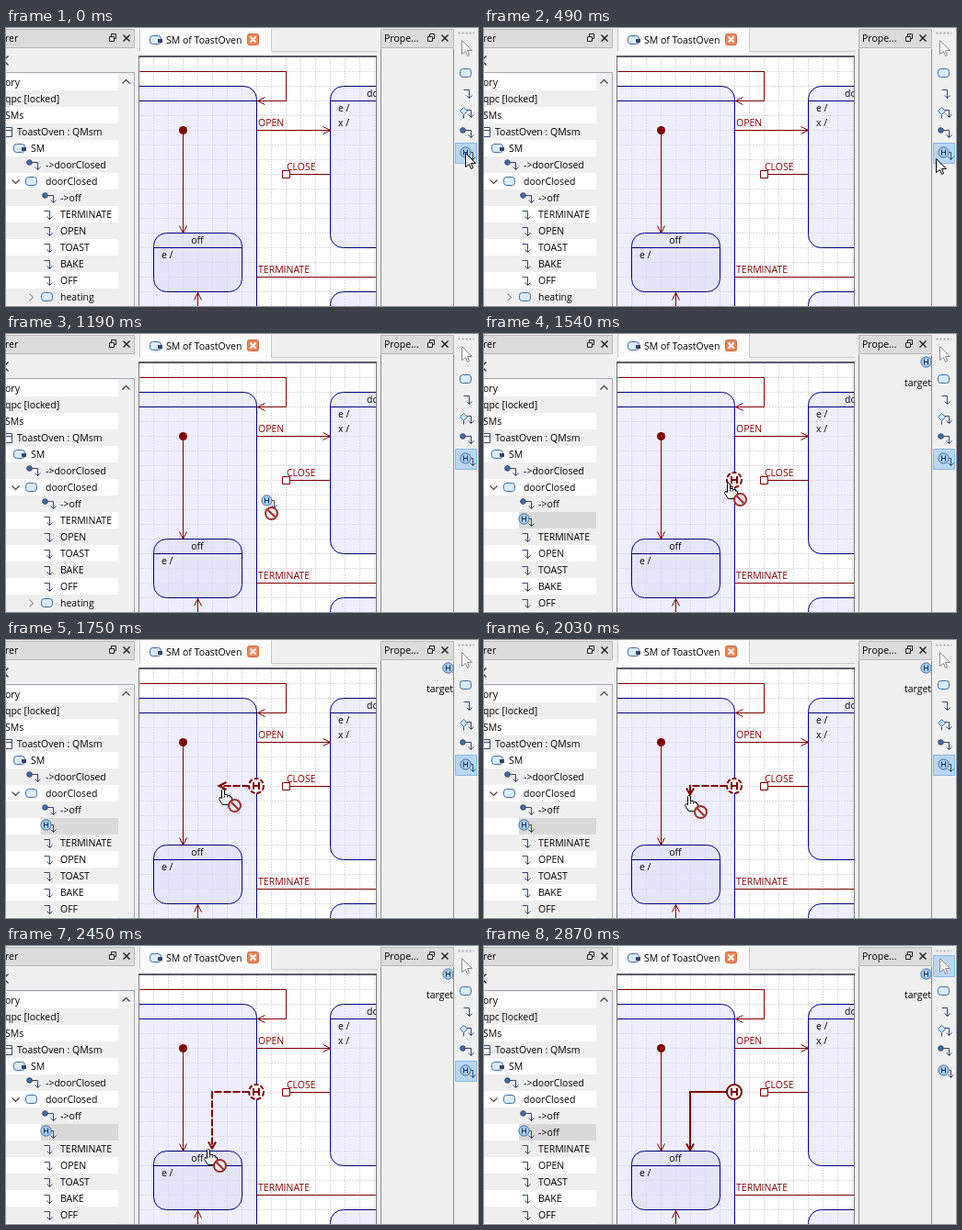
An HTML page with a canvas for the animation above (4.01 s loop, 513x303 px).

```html
<!DOCTYPE html>
<html lang="en">
<head>
<meta charset="utf-8">
<title>State machine editor</title>
<style>
html, body { margin: 0; width: 100%; height: 100%; overflow: hidden; background: #f0f0f0; }
canvas { display: block; }
</style>
</head>
<body>
<canvas id="stage" width="513" height="303"></canvas>
<script>
const ctx = document.getElementById('stage').getContext('2d');
const LOOP = 4010, STEP = 70, DRAG = 560, DROP = 1470, DONE = 2870;
const RED = '#800000', NAVY = '#000080', ICON = '#34466e', BLUE = '#a9cdf0';
const FONT = '10.5px "Open Sans", "Noto Sans", sans-serif';

// Pointer way: time, x, y
const way = [
  [0, 499, 136], [420, 499, 136], [490, 491, 142], [560, 474, 143], [700, 412, 156],
  [840, 346, 172], [910, 319, 178], [980, 302, 181], [1050, 294, 181], [1190, 283, 181],
  [1260, 272, 163], [1400, 272, 163], [1470, 272, 162], [1610, 259, 162], [1820, 224, 162],
  [1960, 224, 162], [2030, 223, 169], [2240, 223, 200], [2380, 221, 217], [2450, 220, 221],
  [2520, 220, 221], [2590, 221, 223], [LOOP, 221, 223]
];

function pointerAt(t) {
  const i = way.findIndex(p => p[0] > t);
  const a = way[i - 1], b = way[i], k = (t - a[0]) / (b[0] - a[0]);
  return [1, 2].map(n => Math.round(a[n] + (b[n] - a[n]) * k));
}

function rect(x, y, w, h, color) {
  ctx.fillStyle = color;
  ctx.fillRect(x, y, w, h);
}

function clipped(x, y, w, h, draw) {
  ctx.save();
  ctx.beginPath();
  ctx.rect(x, y, w, h);
  ctx.clip();
  draw();
  ctx.restore();
}

function line(points, color, width = 1, dash = []) {
  ctx.beginPath();
  for (let i = 0; i < points.length; i += 2) ctx.lineTo(points[i] + .5, points[i + 1] + .5);
  ctx.strokeStyle = color;
  ctx.lineWidth = width;
  ctx.setLineDash(dash);
  ctx.stroke();
  ctx.setLineDash([]);
}

function text(s, x, y, color = '#000', align = 'left') {
  ctx.font = FONT;
  ctx.textAlign = align;
  ctx.fillStyle = color;
  ctx.fillText(s, x, y);
}

function circle(x, y, r, fill, stroke, width = 1, dash = []) {
  ctx.beginPath();
  ctx.arc(x + .5, y + .5, r, 0, 7);
  ctx.fillStyle = fill;
  ctx.fill();
  if (!stroke) return;
  ctx.strokeStyle = stroke;
  ctx.lineWidth = width;
  ctx.setLineDash(dash);
  ctx.stroke();
  ctx.setLineDash([]);
}

function roundBox(x, y, w, h, r, fill, stroke) {
  ctx.beginPath();
  ctx.roundRect(x + .5, y + .5, w, h, r);
  ctx.fillStyle = fill;
  ctx.fill();
  ctx.strokeStyle = stroke;
  ctx.lineWidth = 1;
  ctx.stroke();
}

// Open arrow head with its tip at x, y, pointing along dx, dy
function head(x, y, dx, dy, len, half, color, width = 1) {
  const bx = x - dx * len, by = y - dy * len;
  line([bx + dy * half, by + dx * half, x, y, bx - dy * half, by - dx * half], color, width);
}

function polygon(x, y, points, fill, stroke) {
  ctx.beginPath();
  for (let i = 0; i < points.length; i += 2) ctx.lineTo(x + points[i] + .5, y + points[i + 1] + .5);
  ctx.closePath();
  ctx.fillStyle = fill;
  ctx.fill();
  ctx.strokeStyle = stroke;
  ctx.lineWidth = 1;
  ctx.stroke();
}

const icons = {
  state: (x, y) => roundBox(x - 6, y - 5, 12, 9, 3, '#d9ecfa', '#3d6a9e'),
  machine(x, y) {
    icons.state(x, y);
    rect(x + 3, y - 1, 5, 4, ICON);
  },
  transition(x, y) {
    line([x - 5, y - 4, x + 1, y - 4, x + 1, y + 5], ICON);
    head(x + 1, y + 5, 0, 1, 3, 3, ICON);
  },
  hook(x, y) {
    line([x - 2, y - 3, x + 5, y - 3, x + 5, y + 5], ICON);
    head(x + 5, y + 5, 0, 1, 3, 3, ICON);
  },
  initial(x, y) {
    icons.hook(x, y);
    circle(x - 4, y - 3, 2.8, '#4a6ba6', ICON);
  },
  choice(x, y) {
    icons.hook(x, y);
    line([x - 3, y + 2, x - 3, y + 6], ICON);
    polygon(x - 3, y - 2, [0, -4, 4, 0, 0, 4, -4, 0], '#cfe6f8', '#3d6a9e');
  },
  history(x, y) {
    line([x + 2, y, x + 8, y, x + 8, y + 8], ICON);
    head(x + 8, y + 8, 0, 1, 3, 3, ICON);
    circle(x, y, 5.6, BLUE, '#3d6a9e');
    line([x - 2, y - 3, x - 2, y + 3], '#12305e');
    line([x + 2, y - 3, x + 2, y + 3], '#12305e');
    line([x - 2, y, x + 2, y], '#12305e');
  },
  project(x, y) {
    roundBox(x - 4, y - 5, 9, 10, 0, '#fff', ICON);
    line([x - 4, y - 2, x + 5, y - 2], ICON);
  }
};

function arrowCursor(x, y, fill = '#fff', stroke = '#000') {
  polygon(x, y, [0, 0, 0, 15, 4, 12, 6, 17, 8, 16, 6, 11, 11, 11], fill, stroke);
}

function handCursor(x, y) {
  polygon(x, y, [-1, 0, 1, 1, 1, 6, 4, 6, 5, 7, 7, 7, 8, 9, 9, 9, 9, 13, 7, 17, -1, 17,
    -5, 11, -4, 9, -2, 10, -2, 1], '#fff', '#000');
  for (const i of [1, 4, 7]) line([x + i, y + 7, x + i, y + 9], '#000');
}

function noEntry(x, y) {
  circle(x, y, 6.5, '#e9e9e9', '#9c2c2c', 2);
  line([x - 4, y - 4, x + 4, y + 4], '#9c2c2c', 2);
}

function panelHeader(x, w, title, titleX, buttonX) {
  roundBox(x, 1, w, 20, 0, '#dcdcdc', '#b8b8b8');
  text(title, titleX, 15);
  roundBox(buttonX + 2, 6, 5, 5, 0, '#dcdcdc', '#222');
  roundBox(buttonX, 9, 5, 5, 0, '#dcdcdc', '#222');
  line([buttonX + 15, 7, buttonX + 22, 14], '#222', 1.5);
  line([buttonX + 22, 7, buttonX + 15, 14], '#222', 1.5);
}

function drawTree(t) {
  panelHeader(-1, 140, 'rer', -1, 112);
  line([2, 30, -3, 35, 2, 40], '#333', 1.3);

  const rows = [
    ['ory', -1], ['qpc [locked]', -1], ['SMs', -1],
    ['ToastOven : QMsm', 12, 'project', 1], ['SM', 27, 'machine', 14],
    ['->doorClosed', 43, 'initial', 29], ['doorClosed', 43, 'state', 27, 'open'],
    ['->off', 59, 'initial', 46],
    ...['TERMINATE', 'OPEN', 'TOAST', 'BAKE', 'OFF'].map(s => [s, 59, 'transition', 46]),
    ['heating', 59, 'state', 44, 'closed']
  ];
  if (t >= DROP) rows.splice(8, 0, [t >= DONE ? '->off' : '', 59, 'history', 43, 'selected']);

  clipped(0, 49, 122, 254, () => rows.forEach(([label, x, icon, ix, mode], i) => {
    const y = 59 + i * 18;
    rect(0, y - 9, 122, 18, i % 2 ? '#efefef' : '#fff');
    if (mode === 'selected') rect(38, y - 9, 84, 18, '#d9d9d9');
    if (mode === 'open') line([6, y - 2, 10, y + 2, 14, y - 2], '#444', 1.2);
    if (mode === 'closed') line([25, y - 4, 29, y, 25, y + 4], '#999', 1.2);
    if (icon) icons[icon](ix, icon === 'history' ? y - 2 : y);
    text(label, x, y + 4);
  }));
  line([126, 60, 130, 56, 134, 60], '#555', 1.5);
  line([0, 48, 139, 48, 139, 303], '#a5a8ad');
}

function drawTab() {
  rect(145, 0, 144, 30, '#fcfcfc');
  line([145, 0, 145, 25], '#c8c8c8');
  line([288, 0, 288, 25, 403, 25], '#c8c8c8');
  icons.machine(162, 13);
  text('SM of ToastOven', 174, 17);
  roundBox(262, 6, 12, 12, 2, '#e8875a', '#cf6a3c');
  line([265, 9, 271, 15], '#fff', 1.8);
  line([271, 9, 265, 15], '#fff', 1.8);
}

function stateBox(x, y, w, h, split) {
  roundBox(x, y, w, h, 14, 'rgba(222,222,250,.5)', NAVY);
  line([x, split, x + w, split], NAVY);
}

function drawDiagram(t, [px, py]) {
  clipped(145, 31, 257, 272, () => {
    rect(145, 31, 257, 272, '#fff');
    for (let x = 160; x < 402; x += 16) line([x, 31, x, 303], '#b8b8b8', 1, [1, 2]);
    for (let y = 47; y < 303; y += 16) line([145, y, 402, y], '#b8b8b8', 1, [1, 2]);

    stateBox(80, 63, 192, 300, 79);
    stateBox(352, 63, 120, 176, 79);
    stateBox(352, 287, 120, 80, 303);
    stateBox(160, 223, 96, 64, 239);
    text('off', 208, 235, '#000', 'center');
    text('e /', 169, 251);
    text('do', 392, 75);
    text('e /', 361, 91);
    text('x /', 361, 107);

    line([145, 47, 304, 47, 304, 79, 273, 79], RED);
    head(273, 79, -1, 0, 8, 4, RED);
    circle(192, 111, 4.5, RED);
    line([192, 111, 192, 223], RED);
    head(192, 223, 0, 1, 8, 4, RED);
    line([272, 111, 352, 111], RED);
    head(352, 111, 1, 0, 8, 4, RED);
    roundBox(300, 155, 8, 8, 0, '#fff', RED);
    line([308, 159, 352, 159], RED);
    line([272, 271, 402, 271], RED);
    line([208, 288, 208, 303], RED);
    head(208, 288, 0, -1, 8, 4, RED);
    text('OPEN', 274, 107, RED);
    text('CLOSE', 305, 155, RED);
    text('TERMINATE', 274, 267, RED);

    if (t >= DROP) drawHistory(t >= DONE, px, py);
  });
  line([144, 303, 144, 30], '#777');
  line([402, 303, 402, 30], '#777');
  rect(144, 30, 259, 2, '#5c5c66');
}

function drawHistory(done, px, py) {
  const dash = done ? [] : [8, 2];
  const x = 223.5, y = 158.5;
  if (done || py > 165) {
    const end = done ? 222 : Math.min(py - 1, 222);
    line([264, y, x, y, x, end], RED, 2, dash);
    head(x, end, 0, 1, 7, 4, RED, 2);
  } else if (px < 266) {
    line([264, y, px - 4, y], RED, 2, dash);
    head(px - 5, y, -1, 0, 8, 4, RED, 2);
  }
  circle(271.5, y, 8, '#fff', RED, 2, done ? [] : [5, 2]);
  line([268.5, 154.5, 268.5, 162.5], RED, 2);
  line([274.5, 154.5, 274.5, 162.5], RED, 2);
  line([268.5, y, 274.5, y], RED, 2);
}

function drawProperties(t) {
  panelHeader(407, 79, 'Prope...', 411, 458);
  line([407, 303, 407, 22], '#8c8c8c');
  line([486, 303, 486, 22], '#8c8c8c');
  if (t < DROP) return;
  clipped(408, 22, 78, 281, () => {
    icons.history(480, 30);
    text('target', 457, 57);
  });
}

function drawTools(t) {
  rect(487, 0, 26, 303, '#f0f0f0');
  const done = t >= DONE;
  roundBox(488, done ? 10 : 125, 23, done ? 23 : 22, 0, '#b9d7f5', '#8ab8e8');
  line([491, 5, 508, 5], '#aaa', 2, [2, 2]);
  arrowCursor(495, 13, '#fafafa', '#8a8a8a');
  icons.state(499, 49);
  icons.transition(502, 71);
  icons.choice(500, 92);
  icons.initial(500, 114);
  icons.history(499, 135);
}

function drawPointer(t, [x, y]) {
  if (t >= DONE) return;
  if (t < DRAG) return arrowCursor(x, y);
  if (t < DROP) {
    icons.history(x, y);
    noEntry(x + 5, y + 14);
  } else {
    handCursor(x, y);
    noEntry(x + 12, y + 18);
  }
}

function frame(now) {
  const t = Math.floor(now % LOOP / STEP) * STEP;
  const pointer = pointerAt(t);
  rect(0, 0, 513, 303, '#f0f0f0');
  drawTree(t);
  drawTab();
  drawDiagram(t, pointer);
  drawProperties(t);
  drawTools(t);
  drawPointer(t, pointer);
  requestAnimationFrame(frame);
}
requestAnimationFrame(frame);
</script>
</body>
</html>
```
